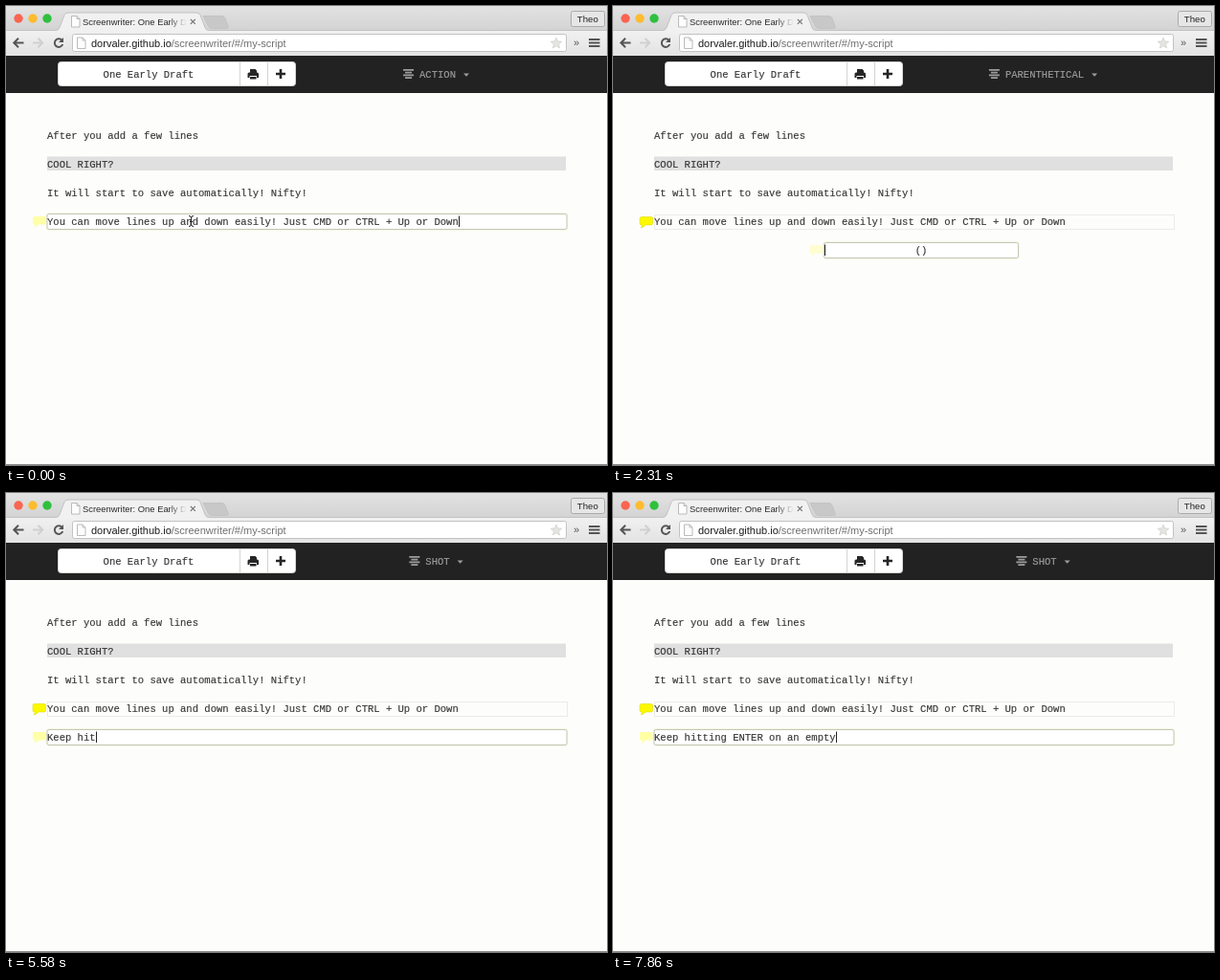
An HTML page for the animation above (8000 ms loop, 628 px wide and 480 px high).

```html
<!DOCTYPE html>
<html lang="en">
<head>
<meta charset="utf-8">
<title>Screenwriter</title>
<style>
html, body { margin: 0; width: 100%; height: 100%; overflow: hidden; background: #fdfdfb; }
svg { display: block; width: 628px; height: 480px; }
text { font-family: "Liberation Sans", Arial, sans-serif; white-space: pre; }
.mono { font: 10.54px "Liberation Mono", "Courier New", monospace; fill: #363636; stroke: #363636; stroke-width: .15px; }
#kind text { fill: #9d9d9d; stroke: #9d9d9d; }
.box { stroke: #c3c8b8; }
.glow { fill: none; stroke: #eeeec4; stroke-width: 2.4px; opacity: .6; }
.caret { stroke: #222; }
</style>
</head>
<body>
<svg viewBox="0 0 628 480">
  <defs>
    <linearGradient id="strip" x2="0" y2="1">
      <stop stop-color="#e2e2e2"/><stop offset="1" stop-color="#d3d3d3"/>
    </linearGradient>
    <linearGradient id="bar" x2="0" y2="1">
      <stop stop-color="#f1f1f1"/><stop offset="1" stop-color="#e3e3e3"/>
    </linearGradient>
    <linearGradient id="fade">
      <stop stop-color="#f1f1f1" stop-opacity="0"/><stop offset="1" stop-color="#f1f1f1"/>
    </linearGradient>
    <path id="page" d="M.5.5h5.5l3 3v8.500h-8.500zM6 .5v3h3" fill="#fdfdfd" stroke="#b4b4b4" stroke-width=".9"/>
    <path id="bubble" d="M2 0h10.500q1.500 0 1.500 1.500v5.500q0 1.500-1.500 1.500h-6q-2 2.500-5 3q1.500-1 1.300-3h-.8q-1.500 0-1.500-1.500v-5.500q0-1.500 1.500-1.500z"/>
  </defs>

  <rect width="628" height="480" fill="#fdfdfb"/>

  <!-- Browser window -->
  <rect width="628" height="26" fill="url(#strip)"/>
  <circle cx="13" cy="13" r="4.700" fill="#fa6450"/>
  <circle cx="28" cy="13" r="4.700" fill="#fdbc2f"/>
  <circle cx="43" cy="13" r="4.700" fill="#2fc03d"/>
  <path d="M206 10.500h20q2 0 3 2.500l3 8q1 2.500-1.500 2.500h-15q-3 0-4-2.500z" fill="#c8c8c8" stroke="#bebebe" stroke-width=".7"/>
  <rect y="25" width="628" height="27" fill="url(#bar)"/>
  <path d="M0 25.500H52q3 0 4-3l5-13q1-2.500 4-2.500H199q3 0 4 2.500l5 13q1 3 4 3H628" fill="#f1f1f1" stroke="#b8b8b8" stroke-width=".8"/>
  <use href="#page" x="68" y="10"/>
  <text x="80" y="19.500" font-size="9.400" fill="#2a2a2a">Screenwriter: One Early D</text>
  <rect x="170" y="9" width="19" height="14" fill="url(#fade)"/>
  <path d="M192.800 13.800l5 5m0-5l-5 5" stroke="#6c6c6c" stroke-width="1.100"/>
  <rect x="590.500" y="5.500" width="35" height="16" rx="2" fill="#e6e6e6" stroke="#aaa"/>
  <text x="607.800" y="17" font-size="9.600" text-anchor="middle" fill="#222">Theo</text>

  <g fill="none" stroke="#555" stroke-width="2">
    <path d="M18.500 38.500H9M13 33.800l-4.700 4.700 4.700 4.700"/>
    <path d="M28 38.500h9.500M33.500 33.800l4.700 4.700-4.700 4.700" stroke="#d0d0d0"/>
    <path d="M58.500 36a4.300 4.300 0 1 0 .7 4"/>
    <path d="M609 35h11.500M609 38.500h11.500M609 42h11.500"/>
  </g>
  <path d="M60 33v5h-5z" fill="#555"/>
  <rect x="69.500" y="29.500" width="516" height="18" rx="2" fill="#fff" stroke="#c2c2c2"/>
  <use href="#page" x="74" y="32.500"/>
  <text x="89" y="42.500" font-size="11" fill="#1c1c1c">dorvaler.github.io<tspan fill="#6f6f6f">/screenwriter/#/my-script</tspan></text>
  <path d="M575 33l1.600 3.900 4.200.3-3.200 2.700 1 4.100-3.600-2.200-3.600 2.200 1-4.100-3.200-2.700 4.200-.3z" fill="#e4e4e0" stroke="#d2d2d0" stroke-width=".8"/>
  <text x="593" y="42" font-size="11" fill="#555">»</text>

  <!-- Application bar -->
  <rect y="52" width="628" height="39" fill="#222"/>
  <rect x="54.500" y="58.500" width="248" height="25" rx="3" fill="#fff" stroke="#d4d4d0"/>
  <path d="M244.500 59v24M273.500 59v24" stroke="#d4d4d0"/>
  <text class="mono" x="149" y="75" text-anchor="middle">One Early Draft</text>
  <path d="M255 66h5.500l1.500 1.500v2.500h-7zM252.500 71q0-1.500 1.500-1.500h8.500q1.500 0 1.500 1.500v4h-2v-2h-7.500v2h-2zM255 74h6.500v2.500h-6.500z" fill="#262626"/>
  <path d="M287 66v10M282 71h10" stroke="#262626" stroke-width="2.600"/>
  <g id="kind">
    <path d="M0 66.800h11M2 69.600h7M0 72.400h11M2 75.200h7" stroke="#9d9d9d" stroke-width="1.700"/>
    <text class="mono" x="17" y="75"></text>
    <path id="arrow" d="M0 70.500h6l-3 3.200z" fill="#9d9d9d"/>
  </g>

  <!-- Script -->
  <rect x="43" y="157.500" width="542" height="14.500" fill="#e0e0e0"/>
  <rect id="idle" x="43.500" y="218.500" width="543" height="15" fill="none" stroke="#d9d9d6" stroke-dasharray="1 1"/>
  <g id="focus">
    <rect class="glow" y="-8"/>
    <rect class="box" y="-8"/>
    <use href="#bubble" x="-15.500" y="-5.500" fill="#ffffa6"/>
  </g>
  <use id="note" href="#bubble" x="27.500" y="220.500" fill="#fcf800" stroke="#d8d400" stroke-width=".5"/>
  <text class="mono" x="43" y="139">After you add a few lines</text>
  <text class="mono" x="43" y="169">COOL RIGHT?</text>
  <text class="mono" x="43" y="199">It will start to save automatically! Nifty!</text>
  <text class="mono" x="43" y="229">You can move lines up and down easily! Just CMD or CTRL + Up or Down</text>
  <text class="mono" id="hint" y="259"></text>
  <text class="mono" id="typed" x="43" y="259"></text>
  <path id="caret" class="caret" d="M.5-6v11.500"/>
  <path id="mouse" d="M191 219.500q2.500 0 2.500 2v7q0 2-2.500 2M196 219.500q-2.500 0-2.500 2v7q0 2 2.500 2M192 225.500h3" fill="none" stroke="#222"/>
  <path d="M0 479.500h628" stroke="#8e8e8e"/>
</svg>
<script>
const LOOP = 8000, CHAR = 6.324;
const $ = id => document.getElementById(id);
const set = (el, attrs) => { for (const k in attrs) el.setAttribute(k, attrs[k]); };
const show = (id, on) => set($(id), { visibility: on ? 'visible' : 'hidden' });

const LAYOUT = {
  ACTION: { x: 43, w: 543 },
  CHARACTER: { x: 43, w: 543, hint: 'CHARACTER', align: 'middle', fill: '#eaf4fc' },
  DIALOGUE: { x: 138, w: 353, hint: 'Dialogue' },
  PARENTHETICAL: { x: 220.5, w: 203, hint: '()', align: 'middle', ink: '#363636' },
  TRANSITION: { x: 43, w: 543, hint: 'TRANSITION', align: 'end' },
  SHOT: { x: 43, w: 543, hint: 'SHOT' }
};
const STEPS = [[0, 'ACTION'], [210, 'CHARACTER'], [1410, 'PARENTHETICAL'], [1800, 'DIALOGUE'],
  [2310, 'PARENTHETICAL'], [2700, 'TRANSITION'], [3030, 'SHOT']];
const CARET_OFF = [[730, 1230], [2160, 2310], [3600, 3840]];
const TEXT = 'Keep hitting ENTER on an empty';
// One time per key press
const KEYS = [4140, 4320, 4470, 4590, 4680, 4890, 4980, 5400, 5670, 5730, 5800, 5880, 6030,
  6240, 6330, 6420, 6510, 6630, 6780, 6930, 7020, 7110, 7200, 7290, 7380, 7470, 7560, 7650, 7770, 7860];

const label = $('kind').querySelector('text');
const [glow, box, bubble] = $('focus').children;

function draw(t) {
  const [start, kind] = STEPS.filter(s => s[0] <= t).pop();
  const { x, w, hint = '', align = 'start', fill = '#fff', ink = '#cdcdcd' } = LAYOUT[kind];
  const first = kind === 'ACTION';
  const count = KEYS.filter(k => k <= t).length;
  const y = first ? 225.5 : 255.5;

  label.textContent = kind;
  const width = kind.length * CHAR;
  set($('kind'), { transform: `translate(${449.5 - (width + 31) / 2})` });
  set($('arrow'), { transform: `translate(${width + 25})` });

  set($('focus'), { transform: `translate(${x} ${y})` });
  for (const r of [glow, box]) set(r, { width: w, height: 16, rx: 2 });
  box.style.fill = fill;
  set(bubble, { opacity: first ? 1 : Math.min(1, .5 + (t - start) / 240) });

  const hintX = { start: x, middle: x + w / 2, end: x + w }[align];
  set($('hint'), { x: hintX, 'text-anchor': align });
  $('hint').style.fill = $('hint').style.stroke = ink;
  $('hint').textContent = count ? '' : hint;
  $('typed').textContent = TEXT.slice(0, count);

  const end = first ? 68 : count;
  set($('caret'), { transform: `translate(${Math.round(x + end * CHAR)} ${y})` });
  show('caret', !CARET_OFF.some(([a, b]) => t >= a && t < b));
  show('mouse', first);
  show('note', !first);
  show('idle', !first);
}

const origin = performance.now();
function tick() {
  draw((performance.now() - origin) % LOOP);
  requestAnimationFrame(tick);
}
tick();
</script>
</body>
</html>
```
